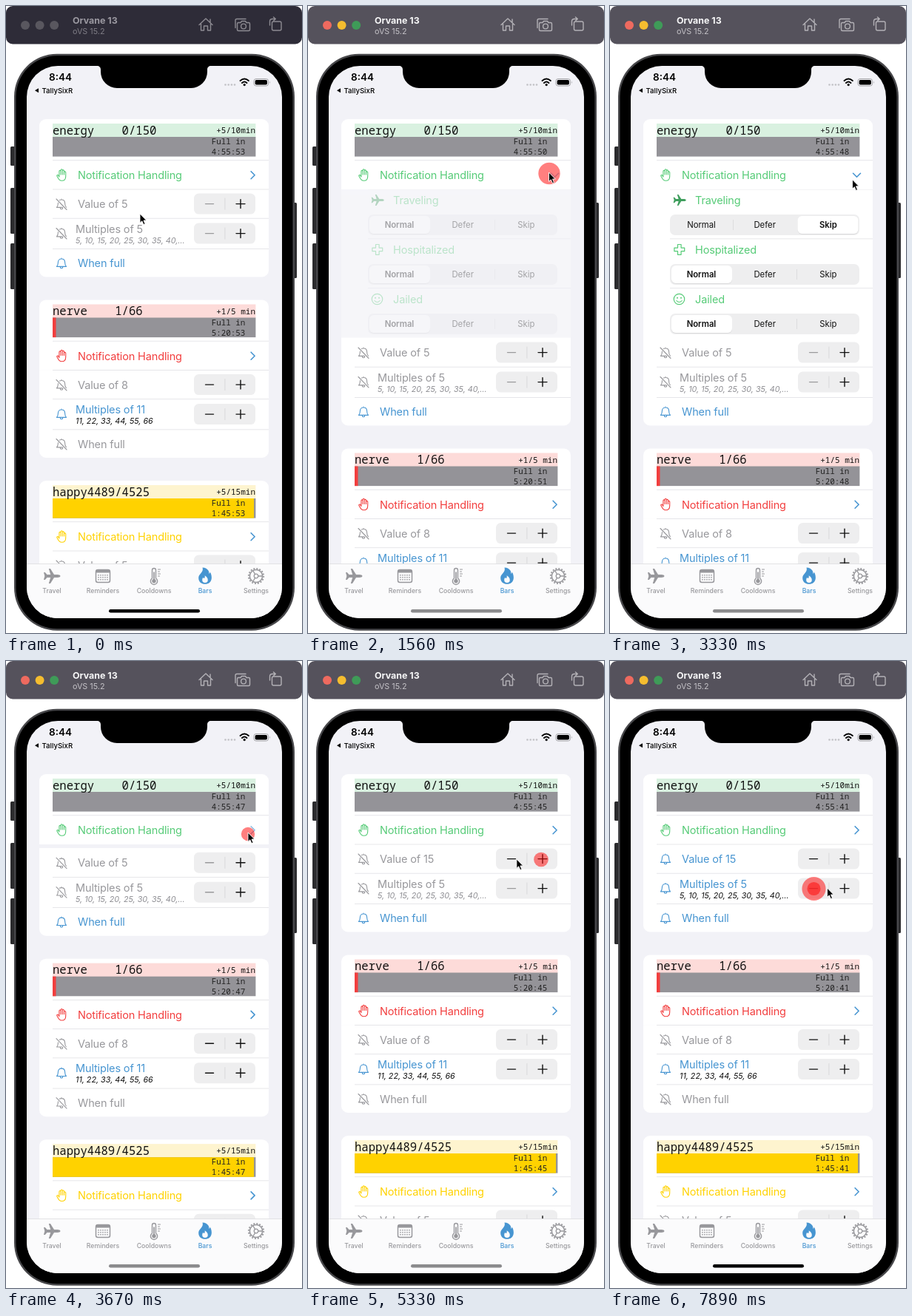
These frames come from a looping animation (400x848 px, 8000 ms). An HTML page:

```html
<!DOCTYPE html>
<html lang="en">
<head>
<meta charset="utf-8">
<title>Bars</title>
<style>
html, body { margin: 0; width: 100%; height: 100%; overflow: hidden; background: #fff; }
svg { display: block; }
text { font-family: Inter, Roboto, sans-serif; white-space: pre; }
.mono { font-family: "Noto Sans Mono", "DejaVu Sans Mono", monospace; }
.line { fill: none; stroke-linecap: round; stroke-linejoin: round; }
</style>
</head>
<body>
<svg id="stage" width="400" height="848" viewBox="0 0 400 848"></svg>
<script>
const LOOP = 8000, STEP = LOOP / 72, TICK = 2000 / 3;
const BLUE = '#4795d1', GRAY = '#98989c', GREEN = '#56cb77', RED = '#f23e3e', YELLOW = '#ffd200';

// Tables of [time, ...values], linear between rows
const CURSOR = [
  [670, 181, 281], [1110, 325.5, 225], [1560, 325.5, 225], [1890, 275, 292], [2112, 275, 292],
  [2222, 223, 347.5], [2780, 228, 425], [3110, 345, 330], [3340, 327, 232], [4000, 327, 232],
  [4440, 315, 268], [5112, 315, 268], [5333, 282, 268], [5670, 150, 267], [5890, 150, 267],
  [6220, 167.5, 301], [6670, 167.5, 301], [7330, 275, 307], [7780, 275, 307], [7889, 293.5, 307]
];
const GAP = [[1445, 0], [1555, 201], [3445, 201], [3556, 60], [3667, 5], [3777, 0]];
const FADE = [[1445, 0], [1556, .35], [1667, .8], [1777, 1], [3445, 1], [3556, .3], [3666, 0]];
// Opacity of the right and the down chevron
const CHEVRON = [
  [1400, 1, 0], [1444, 0, 0], [1667, 0, 1], [3400, 0, 1], [3445, 0, 0], [3667, .6, 0], [3777, 1, 0]
];
const PILL = [[2060, 83], [2111, 105], [2222, 236], [2333, 253.5]];
const TAPS = [
  [1375, 326, 226.5], [2024, 275, 292.5], [3366, 327, 234], [4550, 315, 268.5], [5047, 315, 268.5],
  [5690, 150, 268], [6310, 167, 303], [7586, 275.5, 308], [7738, 275.5, 308]
];

function at(table, t) {
  const i = table.findIndex(row => row[0] > t);
  if (i === 0) return table[0].slice(1);
  if (i < 0) return table[table.length - 1].slice(1);
  const a = table[i - 1], b = table[i], p = (t - a[0]) / (b[0] - a[0]);
  return a.slice(1).map((v, j) => v + (b[j + 1] - v) * p);
}

const rect = (x, y, w, h, fill, r = 0, more = '') =>
  `<rect x="${x}" y="${y}" width="${w}" height="${h}" rx="${r}" fill="${fill}" ${more}/>`;
const disc = (x, y, r, fill, more = '') => `<circle cx="${x}" cy="${y}" r="${r}" fill="${fill}" ${more}/>`;
const text = (x, y, s, size, fill, more = '') =>
  `<text x="${x}" y="${y}" font-size="${size}" fill="${fill}" ${more}>${s}</text>`;
const line = (d, color, w = 1, more = '') =>
  `<path class="line" d="${d}" stroke="${color}" stroke-width="${w}" ${more}/>`;
const shape = (d, fill) => `<path d="${d}" fill="${fill}"/>`;
const move = (x, y, s, more = '') => `<g transform="translate(${x} ${y}) ${more}">${s}</g>`;
const rule = (x, y) => rect(x, y, 355 - x, .8, '#e0e0e4');
const label = (x, y, s, fill) => text(x, y, s, 14.5, fill, 'letter-spacing="-.14"');

const HAND = 'M-3.6 2.4V-5a1.1 1.1 0 0 1 2.2 0V-.5M-1.4-4V-6.6a1.1 1.1 0 0 1 2.2 0V-.5M.8-5.5a1.1 1.1 0 0 1 2.2 0V-.5' +
  'M3-3.5a1.1 1.1 0 0 1 2.2 0V2C5.2 6 3 7.8 0 7.8S-4.2 6.3-6.6 1.5a1 1 0 0 1 1.8-.9L-3.6 2.4';
const BELL = 'M-6.5 4.4C-5 3-4.6 2-4.6-1.2C-4.6-4.2-2.8-6 0-6S4.6-4.2 4.6-1.2C4.6 2 5 3 6.5 4.4ZM-1.8 4.8a1.8 2 0 0 0 3.6 0M0-6V-7';
const PLANE = 'M11.5 0C11.5-1.3 9.5-2 7.5-2H3L-2-10H-4.2L-1.8-2H-6.5L-9.2-5H-11L-9.7 0L-11 5H-9.2L-6.5 2H-1.8L-4.2 10H-2L3 2H7.5C9.5 2 11.5 1.3 11.5 0Z';

const bell = (y, on) => move(75, y, line(BELL, on ? BLUE : GRAY, 1.1) +
  (on ? '' : line('M-7-7L7 7.5', '#fff', 3) + line('M-7-7L7 7.5', GRAY, 1.1)));

function stepper(y, canDrop) {
  return rect(254, y - 14, 83, 28, '#eeeeef', 6.5) + rect(295.5, y - 8, .8, 16, '#d4d4d6') +
    line(`M269.5 ${y}h11`, canDrop ? '#111' : '#9a9a9c', 1.4) +
    line(`M311 ${y}h12M317 ${y - 6}v12`, '#111', 1.4);
}

function segments(y, x, chosen) {
  const names = ['Normal', 'Defer', 'Skip'];
  return rect(81, y, 256, 28, '#eeeeef', 7) +
    rect(chosen ? 166 : 252, y + 7, .8, 14, '#d8d8da') +
    rect(x, y + 2, 82, 24, '#000', 6, 'opacity=".08" transform="translate(0 1)"') +
    rect(x, y + 2, 82, 24, '#fff', 6) +
    names.map((s, i) => text(123.5 + 85.7 * i, y + 18.2, s, 11.3, '#111',
      `text-anchor="middle" font-weight="${i === chosen ? 600 : 400}"`)).join('');
}

// Extra rows of the first card, placed below its heading row
function details(t) {
  const [x] = at(PILL, t);
  const row = (y, name) => label(115, y + 5, name, GREEN);
  return rect(45, 248, 310, 201, '#fff') + rule(81, 247.6) +
    move(94, 262.5, shape(PLANE, '#3f9e5d'), 'scale(.76)') + row(263, 'Traveling') + segments(282, x, x > 160 ? 2 : 0) +
    rule(81, 314.5) +
    line('M91.5 322.5h4.6v4.6h4.6v4.6h-4.6v4.6h-4.6v-4.6h-4.6v-4.6h4.6z', GREEN, 1.2) + row(329.5, 'Hospitalized') +
    segments(349, 83, 0) + rule(81, 381.3) +
    disc(93.5, 396.5, 7.2, 'none', `stroke="${GREEN}" stroke-width="1.2"`) +
    disc(91, 394.8, 1, GREEN) + disc(96, 394.8, 1, GREEN) + line('M89.8 398.5q3.7 4 7.4 0', GREEN, 1.1) +
    row(396.5, 'Jailed') + segments(416, 83, 0);
}

// Cards share one layout, written in the coordinates of the first
function card(c) {
  const bottom = c.cut ? 208.5 : 248;
  const head = shape(`M45 ${bottom}V162a9 9 0 0 1 9-9H346a9 9 0 0 1 9 9V${bottom}Z`, '#fff') +
    rect(63, 159, 274.4, 18.5, c.tint) + rect(63, 177, 274.4, 26.6, '#949398') + rect(63, 177, c.fill, 26.6, c.color) +
    text(63, 173.7, c.title, 15.6, '#111', 'class="mono"') +
    text(337, 172, c.rate, 11, '#111', 'class="mono" text-anchor="end"') +
    text(300.5, 187, 'Full in', 10.9, '#222', 'class="mono" text-anchor="middle"') +
    text(300.5, 201, c.left, 10.9, '#222', 'class="mono" text-anchor="middle"') + rule(63, 208.3);
  if (c.cut) return head;
  const rest = shape('M45 247.8H355V357.5a9 9 0 0 1-9 9H54a9 9 0 0 1-9-9Z', '#fff') +
    (c.flash ? rect(45, 287, 310, 41, '#e5e5ea') : '') +
    (c.gap ? '' : rule(63, 247.6)) + rule(63, 286.8) + rule(63, 328) +
    bell(268, c.valueOn) + label(97, 273, 'Value of ' + c.value, c.valueOn ? BLUE : GRAY) + stepper(267.6, c.value > 5) +
    bell(307.5, c.multOn) + label(94, 306.7, 'Multiples of ' + c.mult, c.multOn ? BLUE : GRAY) +
    text(94, 320.8, c.list, 10.75, c.multOn ? '#111' : '#8e8e93', 'font-style="italic"') +
    stepper(307.6, c.mult > 5) +
    bell(348, c.fullOn) + label(97, 353.2, 'When full', c.fullOn ? BLUE : GRAY);
  const [right, down] = c.chevron || [1, 0];
  const arrow = (angle, opacity) =>
    move(333.5, 228.7, line('M-2.4-5L2.6 0L-2.4 5', BLUE, 1.6, `opacity="${opacity}"`), `rotate(${angle})`);
  return head + move(75.5, 228.5, line(HAND, c.color, 1.1)) +
    label(97, 234, 'Notification Handling', c.color) + arrow(0, right) + arrow(90, down) +
    (c.middle || '') + move(0, c.gap || 0, rest);
}

function content(t) {
  const left = (start, off) => start + (53 - Math.floor((t - off) / TICK) - 1);
  const [gap] = at(GAP, t), [fade] = at(FADE, t);
  const middle = gap ? `<clipPath id="open"><rect x="45" y="248" width="310" height="${gap}"/></clipPath>` +
    `<g clip-path="url(#open)" opacity="${fade}">${details(t)}</g>` : '';
  const energy = card({
    title: 'energy    0/150', rate: '+5/10min', left: left('4:55:', 105), color: GREEN, tint: '#d9f1e0', fill: 0,
    value: t < 4600 ? 5 : t < 5100 ? 10 : 15, valueOn: t > 5770,
    mult: 5, multOn: t > 6440, list: '5, 10, 15, 20, 25, 30, 35, 40,…', fullOn: true,
    flash: t > 6328 && t < 6440, gap, middle, chevron: at(CHEVRON, t)
  });
  const nerve = card({
    title: 'nerve    1/66', rate: '+1/5 min', left: left('5:20:', 325), color: RED, tint: '#fddbd9', fill: 4.5,
    value: 8, mult: 11, multOn: true, list: '11, 22, 33, 44, 55, 66'
  });
  const happy = card({
    title: 'happy4489/4525', rate: '+5/15min', left: left('1:45:', 325), color: YELLOW, tint: '#fef4cf', fill: 272,
    value: 5, mult: 5, list: '', cut: t > 1440 && t < 1550
  });
  return energy + move(0, 244.5 + gap, nerve) + move(0, 489 + gap, happy);
}

function tabBar(t) {
  const dots = Array.from({ length: 15 }, (_, i) =>
    rect(-6.8 + i % 5 * 3, -2 + Math.floor(i / 5) * 3, 1.5, 1.5, GRAY)).join('');
  const icons = [
    shape(PLANE, GRAY),
    rect(-9.5, -8.5, 19, 17, 'none', 2.5, `stroke="${GRAY}" stroke-width="1.5"`) + rect(-9.5, -8.5, 19, 4, GRAY, 1.5) + dots,
    line('M-2.5 3V-8a2.5 2.5 0 0 1 5 0V3a4.6 4.6 0 1 1-5 0Z', GRAY, 1.4) + disc(0, 6.8, 2.7, GRAY) +
      line('M0 6V-5', GRAY, 1.7) + line('M5.5-9h3M5.5-6h2M5.5-3h3M5.5 0h2', GRAY, 1.2),
    shape('M-3.5-11.5C2-11.5 6-7.5 5.3-3.2C6.2-3.6 6.6-4.6 6.6-5.6C8.4-3.4 9 0 8.8 3C8.4 8 5 10.8 0 10.8S-8.8 8-8.8 2.5C-8.8-3-1.5-5-3.5-11.5Z', BLUE) +
      shape('M-.4-.8C2.2.8 3.8 2.8 3.8 5.2A3.8 3.8 0 0 1-3.8 5.2C-3.8 3.8-3.2 2.8-2.5 2.1L-1.3 3.2C-.2 2 0 .8-.4-.8Z', '#fbfbfc'),
    disc(0, 0, 8.6, 'none', `stroke="${GRAY}" stroke-width="1.5"`) +
      disc(0, 0, 10.2, 'none', `stroke="${GRAY}" stroke-width="1.8" stroke-dasharray="2 2.006"`) +
      disc(0, 0, 2.8, 'none', `stroke="${GRAY}" stroke-width="1.3"`) +
      line('M2.8 0H8.4M-1.4-2.4L-4.2-7.3M-1.4 2.4L-4.2 7.3', GRAY, 1.3)
  ];
  const names = ['Travel', 'Reminders', 'Cooldowns', 'Bars', 'Settings'];
  return rect(28, 754, 345, 74, '#fbfbfc') + rect(28, 754, 345, .7, '#d8d8da') +
    names.map((s, i) => move(62 + 69 * i, 771, icons[i]) +
      text(62 + 69 * i, 794, s, 8.7, i === 3 ? BLUE : GRAY, 'text-anchor="middle" font-weight="500"')).join('') +
    rect(139, 816, 123, 4.6, t > 1380 && t < 5550 ? '#8b8b8d' : '#000', 2.3);
}

function status() {
  return text(58, 101.3, '8:44', 13.5, '#000', 'font-weight="600"') +
    shape('M39 114.2l5-3v6z', '#000') + text(48.5, 117.8, 'TallySixR', 9.6, '#000', 'font-weight="500"') +
    [296.5, 300.7, 304.9, 309].map(x => disc(x, 106.5, 1.3, '#c2c2c6')).join('') +
    line('M316.6 101q5.6-5 11.2 0M319 104q3.2-3 6.4 0', '#000', 2) + disc(322.2, 106.6, 1.6, '#000') +
    rect(335, 98.5, 19.5, 9.6, 'none', 3, 'stroke="#a5a5a8" stroke-width="1"') + rect(336.6, 100.1, 16.3, 6.4, '#000', 1.7) +
    shape('M356 101.5q1.6 1.8 0 3.6z', '#a5a5a8') +
    shape('M123 80H277V81C274 81 272 83 272 86V89a22 22 0 0 1-22 22H150a22 22 0 0 1-22-22V86C128 83 126 81 123 81Z', '#000');
}

function toolbar(on) {
  const ink = on ? '#b3b1b6' : '#8d8b92';
  const lights = on ? ['#ee6a5f', '#f5bd2f', '#3f9b58'] : Array(3).fill('#59575f');
  return rect(0, 0, 400, 51.5, on ? '#55525c' : '#2e2c38', 9) +
    lights.map((c, i) => disc(26 + 19.6 * i, 26, 6, c)).join('') +
    text(90, 23.5, 'Orvane 13', 12.4, on ? '#f6f6f7' : '#9b99a1', 'font-weight="700"') +
    text(90, 38, 'oVS 15.2', 10.8, on ? '#c4c2c7' : '#7f7d85') +
    line('M261 25.5L270 17l9 8.5M263.5 24v9h4v-6h5v6h4v-9M276 18v4', ink, 1.4) +
    line('M310 29.5V19.5q0-2 2-2h12', ink, 1.4) +
    line('M314 22.5h3l1.5-2h5l1.5 2h3q1.5 0 1.5 1.5v8q0 1.5-1.5 1.5h-14q-1.5 0-1.5-1.5v-8q0-1.5 1.5-1.5z', ink, 1.4) +
    disc(321, 27.5, 3.4, 'none', `stroke="${ink}" stroke-width="1.4"`) +
    rect(359.5, 21, 12.5, 12, 'none', 2, `stroke="${ink}" stroke-width="1.4"`) +
    line('M356.5 26v-5q0-3.5 3.5-3.5h4M361.5 15l2.8 2.5l-2.8 2.5', ink, 1.4);
}

function phone() {
  const sides = [[190, 26], [246, 62], [321, 62]].map(([y, h]) => rect(6, y, 6, h, '#2b2b2d', 1.5)).join('');
  return sides + rect(388, 266, 5, 102, '#2b2b2d', 1.5) +
    rect(11, 64.7, 379, 780, '#47474a', 58) + rect(13.5, 67.2, 374, 775, '#000', 55.5);
}

function pointer(t) {
  const [x, y] = at(CURSOR, t);
  const taps = TAPS.filter(([s]) => t >= s && t < s + 500)
    .map(([s, cx, cy]) => disc(cx, cy, 23 * (1 - (t - s) / 500), '#f00', 'opacity=".5"')).join('');
  return taps + move(x, y, '<path d="M0 0V12.4L2.8 9.8L4.9 14.6L7 13.7L5 9H8.8Z" fill="#000" stroke="#fff" stroke-width=".9"/>');
}

function scene(t) {
  return `<clipPath id="screen">${rect(28, 81, 345, 747, '#000', 42)}</clipPath>` +
    toolbar(t > 1105) + phone() +
    `<g clip-path="url(#screen)">${rect(28, 81, 345, 747, '#f2f2f7')}${content(t)}${tabBar(t)}${status()}</g>` +
    pointer(t);
}

const stage = document.getElementById('stage');
let shown = -1;
function draw() {
  const step = Math.floor((performance.now() % LOOP + 5) / STEP) % 72;
  if (step !== shown) {
    shown = step;
    stage.innerHTML = scene(step * STEP);
  }
  requestAnimationFrame(draw);
}
draw();
</script>
</body>
</html>
```
